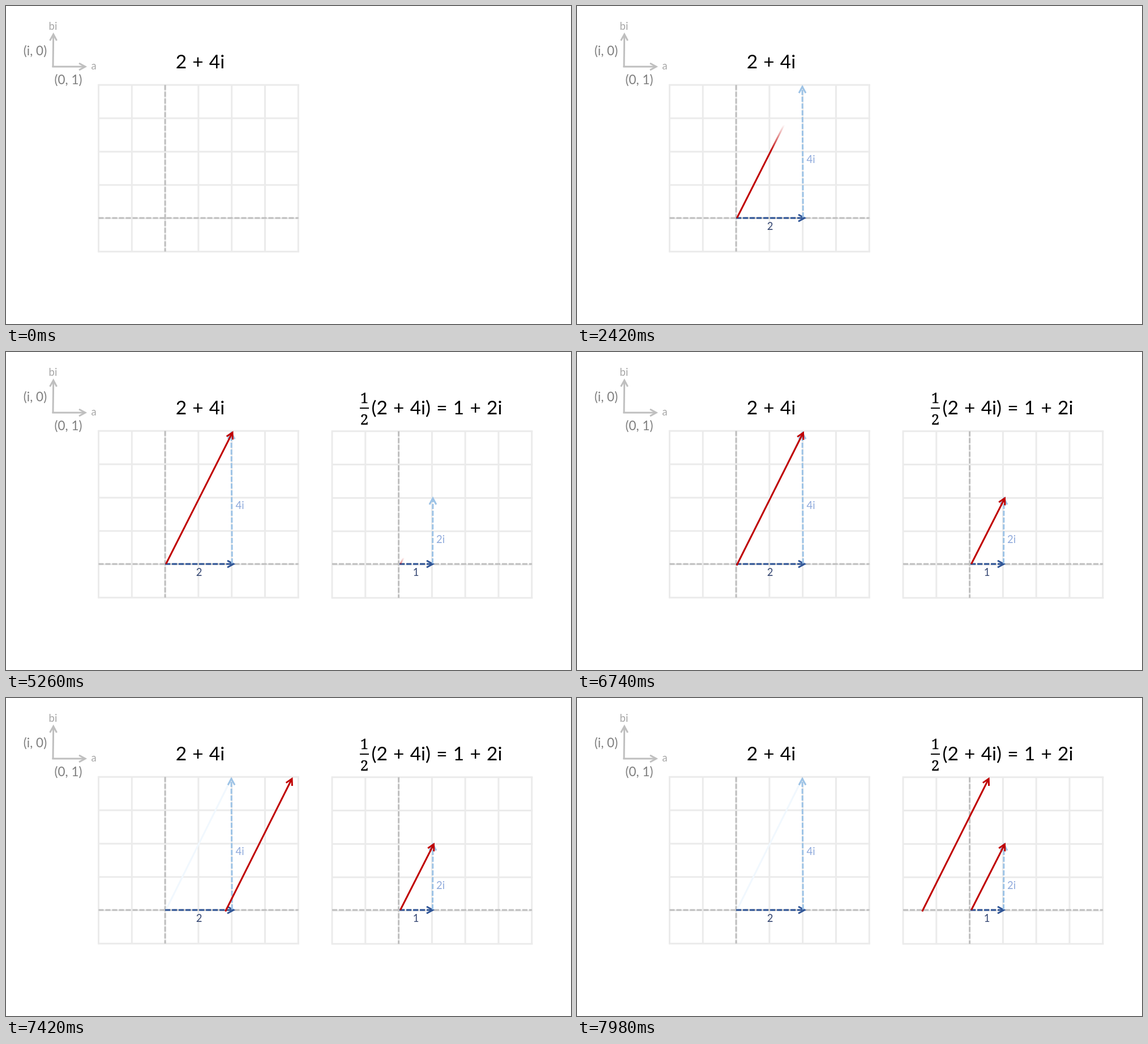
These frames come from a looping animation (998 px wide and 561 px high, 8 s). An HTML page:

```html
<!DOCTYPE html>
<html lang="en">
<head>
<meta charset="utf-8">
<title>Scaling a complex number</title>
<style>
  html, body { margin: 0; width: 100%; height: 100%; overflow: hidden; background: #fff; }
  svg { display: block; width: 998px; height: 561px; font-family: Lato, Carlito, sans-serif; }
  path { fill: none; stroke-width: 3; }
  text { text-anchor: middle; }
  .title { font-size: 33.5px; word-spacing: 1.6px; }
  .half { font: 26px "Noto Serif", serif; stroke: #000; stroke-width: .3px; }
  .small { font-size: 18.5px; }
  .pair { font-size: 22.5px; fill: #7f7f7f; }
</style>
</head>
<body>
<svg id="stage" viewBox="0 0 998 561"></svg>
<script>
const LOOP = 8000;
const GREY = '#bfbfbf', NAVY = '#2f5597', SKY = '#9dc3e6', RED = '#c00000';

const line = (d, color, dash = '') =>
  `<path d="${d}" stroke="${color}" stroke-dasharray="${dash}"/>`;

const text = (x, y, str, cls, fill = '#000') =>
  `<text x="${x}" y="${y}" class="${cls}" fill="${fill}">${str}</text>`;

// Shaft with an open, two-stroke head
function arrow(x1, y1, x2, y2, color, dash) {
  const len = Math.hypot(x2 - x1, y2 - y1);
  const ux = (x2 - x1) / len, uy = (y2 - y1) / len;
  const wing = s => `${x2 - 11 * ux - s * uy} ${y2 - 11 * uy + s * ux}`;
  return line(`M${x1} ${y1}L${x2} ${y2}`, color, dash) +
    line(`M${wing(6)}L${x2} ${y2}L${wing(-6)}`, color);
}

function grid(x, y) {
  const w = 353, h = 294, cell = 58.8;
  let d = '';
  for (let i = 0; i < 7; i++) d += `M${x + i * cell} ${y - 1.5}v${h + 3}`;
  for (let i = 0; i < 6; i++) d += `M${x - 1.5} ${y + i * cell}h${w + 3}`;
  return line(d, '#ebebeb') +
    line(`M${x + 2 * cell} ${y}v${h}M${x} 374h${w}`, GREY, '9 3');
}

// Soft-edged reveals: visible from start, complete at end, sweeping from one coordinate to another
const wipes = [
  { start: 460, end: 900, axis: 'x', from: 280, to: 404,
    art: arrow(281, 374, 402, 374, NAVY, '9 3') + text(341, 395, '2', 'small', '#344672') },
  { start: 1320, end: 1760, axis: 'y', from: 373, to: 140,
    art: arrow(399.3, 373, 398, 142.5, SKY, '9 3') + text(413, 277, '4i', 'small', '#8faadc') },
  { start: 2180, end: 2620, axis: 'y', from: 376, to: 139, id: 'firstRed',
    art: arrow(282.5, 374, 400, 142, RED) },
  { start: 3540, end: 3900, axis: 'x', from: 694, to: 756,
    art: arrow(695, 374, 754, 374, NAVY, '9 3') + text(724, 395, '1', 'small', '#344672') },
  { start: 4400, end: 4800, axis: 'y', from: 373, to: 256,
    art: arrow(753.5, 373, 754, 258, SKY, '9 3') + text(767.5, 337, '2i', 'small', '#8faadc') },
  { start: 5260, end: 5660, axis: 'y', from: 376, to: 255,
    art: arrow(696.5, 374, 755.5, 258, RED) }
];

const maskDefs = wipes.map(({ axis }, i) => `
  <linearGradient id="fade${i}" gradientUnits="userSpaceOnUse" x1="0" y1="0" x2="0" y2="0">
    <stop offset="0" stop-color="#fff"/>
    <stop offset="1" stop-color="#fff" stop-opacity="0"/>
  </linearGradient>
  <mask id="mask${i}" maskUnits="userSpaceOnUse" x="0" y="0" width="998" height="561">
    <rect width="998" height="561" fill="url(#fade${i})"/>
  </mask>`).join('');

const stage = document.getElementById('stage');
stage.innerHTML = `<defs>${maskDefs}</defs>` +
  arrow(83, 108, 83.7, 50, GREY) + arrow(81.5, 107, 140, 107, GREY) +
  text(83, 42, 'bi', 'small', '#a6a6a6') + text(155, 112, 'a', 'small', '#a6a6a6') +
  text(51.5, 87, '(i, 0)', 'pair') + text(110, 138, '(0, 1)', 'pair') +
  text(343, 110, '2 + 4i', 'title') + grid(163.5, 139.3) +
  `<g id="right">${grid(576, 139.8)}` +
  text(633, 90, '1', 'half') + text(633, 128, '2', 'half') +
  `<path d="M625 99h16" stroke="#000" style="stroke-width:2"/>` +
  text(761, 110, '(2 + 4i) = 1 + 2i', 'title') + '</g>' +
  `<g id="ghost">${line('M283 373L397 144', '#f1f8fe')}</g>` +
  wipes.map((w, i) => `<g id="${w.id || 'wipe' + i}" mask="url(#mask${i})">${w.art}</g>`).join('') +
  `<g id="moving">${arrow(282, 376.5, 399.5, 142.5, RED)}</g>`;

const el = id => document.getElementById(id);
const show = (id, on) => el(id).setAttribute('visibility', on ? 'visible' : 'hidden');
const clamp = v => Math.min(1, Math.max(0, v));
const ease = u => u * u * u * (10 - 15 * u + 6 * u * u);

function render(t) {
  wipes.forEach(({ start, end, axis, from, to, id }, i) => {
    const p = clamp((t - start + 40) / (end - start + 40));
    const soft = (to - from) * 0.2;
    const front = from + p * (to - from + soft);
    const fade = el('fade' + i);
    fade.setAttribute(axis + '1', front - soft);
    fade.setAttribute(axis + '2', front);
    show(id || 'wipe' + i, t >= start);
  });
  const copied = t >= 6120;
  show('right', t >= 3040);
  show('ghost', copied);
  show('moving', copied);
  if (copied) show('firstRed', false);
  const shift = 413 * ease(clamp((t - 6757) / 1830));
  el('moving').setAttribute('transform', `translate(${shift} 0)`);
}

const began = performance.now();
function tick() {
  render((performance.now() - began) % LOOP);
  requestAnimationFrame(tick);
}
render(0);
requestAnimationFrame(tick);
</script>
</body>
</html>
```
